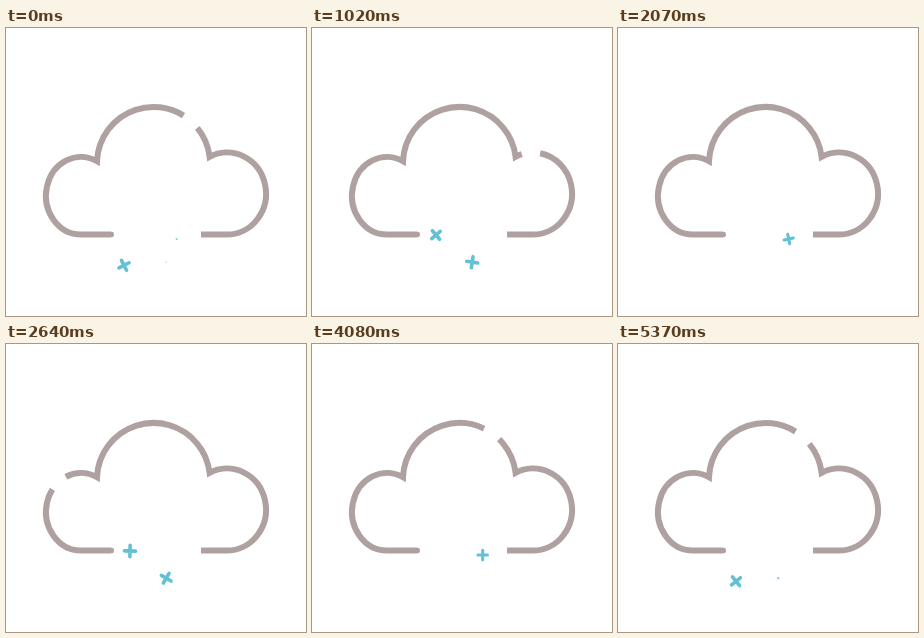
Recreate the animation shown at these times as an HTML page. Size 300 by 288 pixels, loop 5.4 s.

```html
<!DOCTYPE html>
<html lang="en">
<head>
<meta charset="utf-8">
<title>Snow cloud</title>
<style>
  html, body { margin: 0; width: 100%; height: 100%; overflow: hidden; background: #fff; }
  svg { display: block; width: 300px; height: 288px; }

  .cloud {
    fill: none;
    stroke: #b0a1a1;
    stroke-width: 6;
    stroke-dasharray: 96.87 3.13;
    animation: travel 5400ms infinite;
  }
  /* One lap of the gap, then a rest */
  @keyframes travel {
    0% { stroke-dashoffset: 0; animation-timing-function: cubic-bezier(.476, 0, .454, 1); }
    83.33%, 100% { stroke-dashoffset: -100; }
  }

  .flake {
    fill: none;
    stroke: #63c1d5;
    stroke-width: 3.6;
    stroke-linecap: round;
    animation: pop 5400ms linear infinite, spin 5400ms linear infinite;
  }
  @keyframes pop {
    0% { scale: 0; }
    1.5%, 12.2% { scale: 1; }
    16%, 100% { scale: 0; }
  }
  @keyframes spin {
    from { rotate: 0deg; }
    to { rotate: 2160deg; }
  }
</style>
</head>
<body>
<svg viewBox="0 0 300 288" id="stage">
  <path class="cloud" pathLength="100" d="M191.3 99.8
    A56.5 56.5 0 0 1 203.6 128.8
    A39 41 0 1 1 221 206.5 H75
    A35 38.8 0 1 1 91 133.2
    A56.5 56.5 0 0 1 191.3 99.8 Z"/>
  <!-- Opening in the base, with a rounded left end -->
  <path fill="#fff" d="M105 202 H195 V211 H105 V209.5 A3 3 0 0 0 105 203.5 Z"/>
</svg>
<script>
  const NS = 'http://www.w3.org/2000/svg';
  const stage = document.getElementById('stage');
  const STEP = 30, LOOP = 5400;

  // Starts are counted in steps of the loop
  const flakes = [
    { x: 118, y: 237.3, size: 1, turn: -55, starts: [39.2, 105.2, 170.2] },
    { x: 124, y: 207, size: 1, turn: -5, starts: [14.5, 80, 146] },
    { x: 170.7, y: 211, size: .85, turn: 12, starts: [48.5, 114.5, 179.5] },
    { x: 160.2, y: 234.2, size: 1, turn: -12, starts: [17.3, 84.5, 151.8] }
  ];

  function add(parent, tag, attrs) {
    const el = document.createElementNS(NS, tag);
    for (const key in attrs) el.setAttribute(key, attrs[key]);
    return parent.appendChild(el);
  }

  for (const { x, y, size, turn, starts } of flakes) {
    const place = add(stage, 'g', { transform: `translate(${x} ${y}) rotate(${turn}) scale(${size})` });
    for (const start of starts) {
      const flake = add(place, 'path', { class: 'flake', d: 'M-5.6 0H5.6M0 -5.6V5.6' });
      flake.style.animationDelay = `${start * STEP - LOOP}ms`;
    }
  }
</script>
</body>
</html>
```
